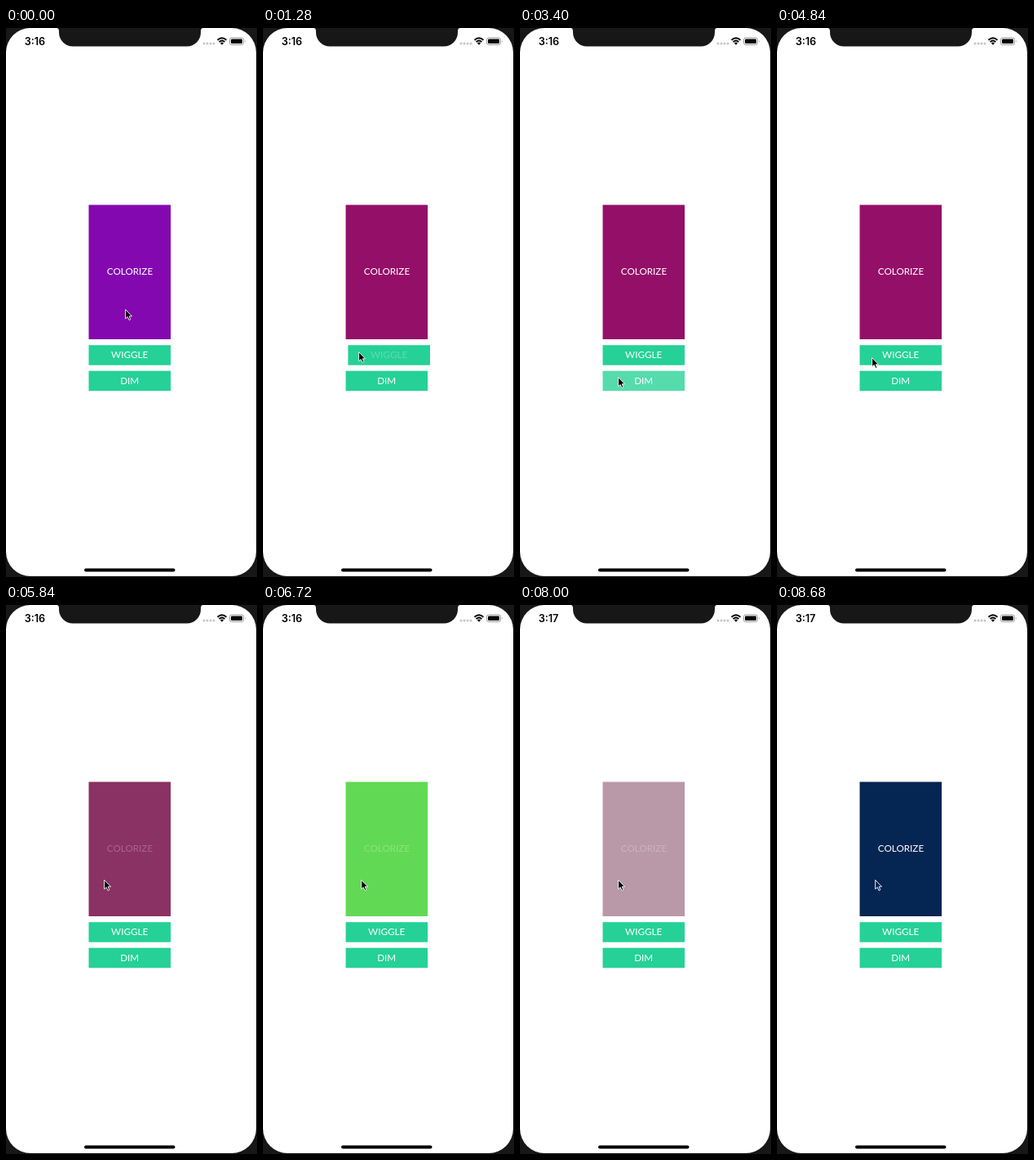
Write an HTML page that moves like this. It is 308 by 672 pixels and loops after 8.72 s.

```html
<!DOCTYPE html>
<html lang="en">
<head>
<meta charset="utf-8">
<title>Button animations</title>
<style>
  html, body { margin: 0; width: 100%; height: 100%; overflow: hidden; background: #171717; }
  svg { display: block; width: 100vw; height: 100vh; }
  .label { font: 11.7px Lato, sans-serif; fill: #fff; text-anchor: middle; }
  #clock { font: 600 12.6px Inter, sans-serif; }
</style>
</head>
<body>
<svg viewBox="0 0 308 672">
  <rect width="307" height="671" rx="30" fill="#fff"/>
  <path fill="#171717" d="M62 0Q65 0 65 4V5.500A17 17 0 0 0 82 22.500H222A17 17 0 0 0 239 5.500V4Q239 0 242 0Z"/>
  <text id="clock" x="22.700" y="21"></text>
  <g fill="#c4c4c4">
    <circle cx="243" cy="19" r="1.500"/><circle cx="247" cy="19" r="1.500"/>
    <circle cx="251" cy="19" r="1.500"/><circle cx="255" cy="19" r="1.500"/>
  </g>
  <g fill="none" stroke="#000" stroke-width="1.900">
    <path d="M259.500 14.700Q265 9.800 270.500 14.700M261.600 17Q265 14 268.400 17"/>
    <path fill="#000" stroke="none" d="M262.900 18.400Q265 16.700 267.100 18.400L265 20.700Z"/>
  </g>
  <rect x="274.500" y="12" width="17" height="8.500" rx="2.300" fill="none" stroke="#999"/>
  <rect x="276" y="13.500" width="14" height="5.500" rx="1.200"/>
  <path fill="#999" d="M293 14.700Q294.700 16.200 293 17.800Z"/>
  <rect x="96" y="661.500" width="111.500" height="4" rx="2"/>

  <g id="colorize">
    <rect x="101.500" y="216.500" width="100.600" height="164.500"/>
    <text class="label" x="152" y="302.400">COLORIZE</text>
  </g>
  <g id="wiggle">
    <rect x="101.500" y="388.200" width="100.600" height="24.500" fill="#25d196"/>
    <text class="label" x="151.700" y="404.200">WIGGLE</text>
  </g>
  <g id="dim">
    <rect x="101.500" y="419.700" width="100.600" height="24.500" fill="#25d196"/>
    <text class="label" x="151.700" y="435.800">DIM</text>
  </g>
  <path id="cursor" stroke="#fff" stroke-width=".9" stroke-linejoin="round"
        d="M-.4-.4V10.700L2.200 8.500L4 12.500L5.800 11.700L4.200 7.800H7.500Z"/>
</svg>
<script>
const LOOP = 8720, FADE = 640, SHAKE = 400, DIM = 680;
const $ = id => document.getElementById(id);

// Press time and the colour it leads to
const colors = [
  [-FADE, [131, 8, 176]],
  [40, [148, 15, 104]],
  [5680, [85, 235, 75]],
  [6520, [141, 157, 114]],
  [7180, [219, 174, 184]],
  [7840, [5, 37, 82]]
];
const shakes = [1190, 1920, 4900];
const dims = [2880, 3800];

// Cursor moves: start, end, x, y
const moves = [
  [0, 1, 147, 345],
  [620, 1080, 118, 397],
  [2440, 2720, 121, 428],
  [4460, 4720, 117, 404],
  [5300, 5560, 121, 337]
];

const clamp = v => Math.min(1, Math.max(0, v));
const ease = v => (v = clamp(v), v * v * (3 - 2 * v));
const mix = (a, b, k) => a + (b - a) * k;
const last = (times, t) => times.filter(p => p <= t).pop() ?? -9999;

// Title dims while its button is held, then fades back
function setTitle(id, times, t) {
  const age = t - last(times, t);
  $(id).lastElementChild.setAttribute("opacity", mix(.25, 1, clamp((age - 230) / 220)));
}

function shakeOffset(age) {
  if (age >= SHAKE) return 0;
  const saw = age % 200 / 100;
  return 3.5 * (1 - 2 * Math.abs(1 - saw));
}

function draw(t) {
  let color = colors[0][1];
  for (const [start, next] of colors) {
    const k = ease((t - start) / FADE);
    color = color.map((c, i) => mix(c, next[i], k));
  }
  $("colorize").firstElementChild.setAttribute("fill", `rgb(${color.map(Math.round)})`);

  const shake = shakeOffset(t - last(shakes, t));
  $("wiggle").setAttribute("transform", `translate(${shake})`);

  const phase = clamp((t - last(dims, t)) / DIM);
  $("dim").setAttribute("opacity", 1 - .5 * ease(1 - Math.abs(2 * phase - 1)));

  setTitle("colorize", colors.map(c => c[0]), t);
  setTitle("wiggle", shakes, t);
  setTitle("dim", dims, t);

  let [, , x, y] = moves[0];
  for (const [start, end, nx, ny] of moves) {
    const k = ease((t - start) / (end - start));
    x = mix(x, nx, k);
    y = mix(y, ny, k);
  }
  $("cursor").setAttribute("transform", `translate(${x} ${y})`);
  $("cursor").setAttribute("fill", t >= 8680 ? "#052552" : "#000");
  $("clock").textContent = t < 7000 ? "3:16" : "3:17";
}

const begin = performance.now();
function frame() {
  draw((performance.now() - begin) % LOOP);
  requestAnimationFrame(frame);
}
frame();
</script>
</body>
</html>
```
